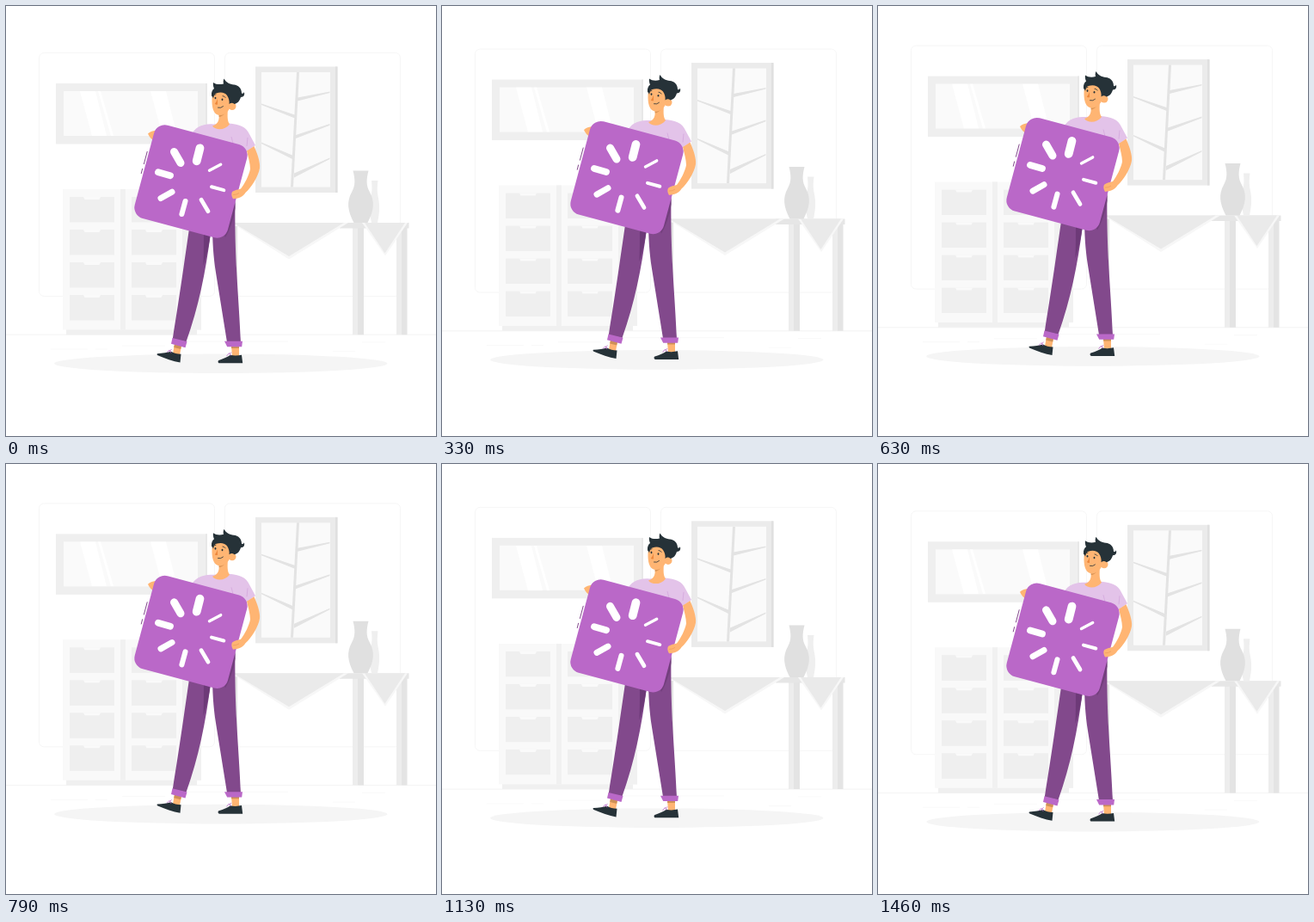
An HTML page that plays this animation: 500x500 px, repeating every 1.5 s.

```html
<!DOCTYPE html>
<html lang="en">
<head>
<meta charset="utf-8">
<title>Floating loader</title>
<style>
html, body { margin: 0; width: 100%; height: 100%; overflow: hidden; background: #fff; }
svg { display: block; width: 100vw; height: 100vh; }
</style>
</head>
<body>
<svg viewBox="0 0 500 500">
<defs>
  <clipPath id="pane"><rect x="67" y="99" width="156" height="52"/></clipPath>
  <g id="drawer">
    <rect width="52" height="29.5" fill="#efefef"/>
    <path d="M16 0h20l-1.500 3h-17z" fill="#fafafa"/>
  </g>
</defs>
<g id="scene">
  <!-- walls and floor -->
  <g fill="none" stroke="#f4f4f4" stroke-width=".8">
    <rect x="38.500" y="54.500" width="204" height="283" rx="5.700"/>
    <rect x="254.500" y="54.500" width="204" height="283" rx="5.700"/>
  </g>
  <path d="M0 382.200H500" stroke="#ebebeb" stroke-width=".6"/>
  <path d="M52 399h43M104 399h14M135 395.200h50M210 390h118M414 391h27M380 401.700h26" stroke="#ebebeb" stroke-width=".3"/>

  <!-- long picture -->
  <rect x="58" y="90" width="176" height="70.500" fill="#efefef"/>
  <path d="M232 90h2v70.500h-2z" fill="#e8e8e8"/>
  <rect x="67" y="99" width="156" height="52" fill="#fafafa"/>
  <g clip-path="url(#pane)" fill="#fff">
    <path d="M86 99h18l13 52h-17zM107 99h3l15 52h-3zM168 99h18l13 52h-17z"/>
  </g>

  <!-- window -->
  <rect x="290" y="70.500" width="95.500" height="146.500" fill="#ebebeb"/>
  <path d="M383 70.500h2.500v146.500h-2.500z" fill="#e0e0e0"/>
  <rect x="297" y="77" width="80" height="133.500" fill="#fafafa"/>
  <g fill="#e3e3e3">
    <path d="M338 77h3L334 210.500h-3z"/>
    <path d="M297 113.500L337 127v4L297 115zM376.500 99.500L339 106.500v4L376.500 101zM376.500 137L337 150v4L376.500 138.700zM297 158.500L334 174v4.500L297 160zM376.500 176.500L335 194.500v5L376.500 178z"/>
  </g>

  <!-- dresser -->
  <path d="M70 376h152v6.200H70z" fill="#f0f0f0"/>
  <path d="M66 213h161v163.500H66z" fill="#f9f9f9"/>
  <path d="M133 213h6v163.500h-6zM205 213h22v163.500h-22z" fill="#f1f1f1"/>
  <g id="drawers"></g>

  <!-- table -->
  <path d="M403 256h6v126.200h-6zM454 256h6v126.200h-6z" fill="#ededed"/>
  <path d="M409 256h7v126.200h-7zM460 256h6.500v126.200h-6.500zM261 256h8v126h-8z" fill="#e4e4e4"/>
  <path d="M388 252h80.500v6.500H388z" fill="#e6e6e6"/>
  <path d="M262 252H398L329 294.500z" fill="#f7f7f7"/>
  <path d="M264 252H393L329 291z" fill="#eaeaea"/>
  <path d="M414 252H467L441 290.500z" fill="#f7f7f7"/>
  <path d="M417 252H464L440.500 287.500z" fill="#eaeaea"/>
  <path d="M425 203h7.500c-1 8-1 12 0 18 2 9 2.500 17-.5 31h-7c-3-14-2.500-22-.5-31 1.200-6 1.200-10 .5-18z" fill="#efefef"/>
  <path d="M403.500 191.500h18c-2.500 10-3 17 1.500 25 6 11 5 21-2.500 35.500h-16c-7.500-14.500-8.500-24.500-2.500-35.500 4.500-8 4-15 1.500-25z" fill="#e0e0e0"/>

  <ellipse cx="249.800" cy="415.800" rx="193.700" ry="11.300" fill="#f5f5f5"/>

  <!-- feet -->
  <g fill="#ffb573">
    <path d="M196 393l8 2-2 11-8-2zM262 395h9v12h-8z"/>
  </g>
  <path d="M196 393l8 2-.8 4-8-2zM262 395h9v3h-9z" fill="#ce9057"/>
  <g fill="#263238">
    <path d="M176 404.200c6-.2 12-1.200 16-2.400 3 2.200 7 2.600 11.500 3l-1 9.700c-8-1.300-18-4.800-26-8.300-1-.6-1.300-1.600-.5-2z"/>
    <path d="M247.500 412c5.500-1.800 10-4 13.500-6.200 4 1.200 9 .8 13-.1l1.200 9.600h-27c-1.700 0-2.200-2.500-.7-3.300z"/>
  </g>
  <path d="M187 403l3-3 2 3.500M190 402l2.500-3M256.500 407l3-3.500 2 3M260 405l2-2.500" fill="none" stroke="#ba68c8" stroke-width=".8"/>

  <!-- trousers -->
  <path d="M216 240L213 259C207 300 203 330 193.800 387l15.700 3.500C224 350 232 310 238 264L250 240z" fill="#82498c"/>
  <path d="M230 260l8 4c-2 14-4 24-8.500 38 .5-14 .5-26 .5-42z" fill="#6d3a78"/>
  <path d="M240 250C240 275 241 290 244 310L257 391h16C271 350 269 325 268 305 267 285 266 260 266.500 220H240z" fill="#82498c"/>
  <path d="M266.500 222L252 262l3 7c6-10 10-22 11.500-34z" fill="#733f7d"/>
  <path d="M193.500 386l17 4.200-2 7-16.500-4.500zM254 389.800h21l-.8 6.400h-17z" fill="#ba68c8"/>

  <!-- shirt, neck -->
  <path d="M214 152C219 141 229 136.500 241 137.500L259 136.500C272 138 279 140 283 149L290 162 280 169 266 230H214z" fill="#e3c3e9"/>
  <path d="M262 152l2 8M281 153l-1 10" stroke="#d3a6dc" stroke-width=".8"/>
  <path d="M247.500 122L258 118C257.500 128 257 133 260 137.500 255 144.500 244 145 240 139.500 247 137 248.500 133 247.500 122z" fill="#ffb573"/>
  <path d="M247.500 125c3 1 6-1 8-3-1 4-4 6.500-7.800 7z" fill="#db9556"/>

  <!-- head -->
  <path d="M241 98C239 106 238.700 117 242 123 245 128.500 253 129 258.500 121.500L266 110 262 96z" fill="#ffb573"/>
  <circle cx="263" cy="116.500" r="4.500" fill="#ffb573"/>
  <path d="M239 104.500C238.500 100 240 97.500 242 96 241 93.500 240.500 91 241 89 244.500 91.500 249 91.500 253 90.500 252.500 88.500 252.500 86.500 253.500 84.500 256 89 260 91 265 91.500 270 92 274 95.500 274 101.500 275.500 102 276.500 101.500 276.800 100 278 103 276.500 106 273 106 272 109.500 270 113 265.500 114 263.500 112 261.500 112.500 259.500 114 260 110 259 107 257 104 255 101 250 99.500 244.500 101.500 243 102 242 103 241 107.500 240.500 106 240 105 239 104.500z" fill="#263238"/>
  <g fill="#263238">
    <ellipse cx="243.500" cy="107" rx=".9" ry="1.300"/>
    <ellipse cx="251.500" cy="108.700" rx=".9" ry="1.300"/>
  </g>
  <path d="M241 104.500q1.200-1.500 3-1.700M252 104.600q2 0 3.200 1.900M246.500 118.200q3.500 1 6-1.500" fill="none" stroke="#263238" stroke-width=".8" stroke-linecap="round"/>
  <path d="M246 107.800q-1.200 4-3.200 6 1.300 1.200 3.200.8z" fill="#ed893e"/>

  <!-- far hand -->
  <path d="M165 148.500C167 146 171 145.300 176 144.500L173 157C169 155.500 166.500 152 165 148.500z" fill="#ffb573"/>

  <!-- board -->
  <rect x="159" y="148" width="112" height="112" rx="13" transform="rotate(15 215 204)" fill="#ba68c8"/>
  <g id="bars" stroke="#fff" stroke-linecap="round"></g>
  <path d="M164.300 169L160.300 184M158.700 189L157.200 195" stroke="#82498c" stroke-width="1"/>

  <!-- near arm -->
  <path d="M288.500 163C292 171 296 182 295 188.500 293.500 198 285.500 211 278.500 217 275.500 222 270 224 264 224.300 262 221 261.800 217.500 263.300 215.800 266 214 270 213.500 273 212.500 278 206 282.500 197 284 189.500 284 183 281.500 175 280 168.500z" fill="#ffb573"/>
  <path d="M264 219.500q4 .2 7-2" fill="none" stroke="#e9965a" stroke-width=".6"/>
</g>
</svg>
<script>
const NS = "http://www.w3.org/2000/svg";
const LOOP = 1500, RISE = 10, LEAD = 30;
const scene = document.getElementById("scene");

function add(parent, tag, attrs) {
  const el = document.createElementNS(NS, tag);
  for (const key in attrs) el.setAttribute(key, attrs[key]);
  document.getElementById(parent).appendChild(el);
}

for (const x of [74, 146])
  for (let row = 0; row < 4; row++)
    add("drawers", "use", { href: "#drawer", x, y: 222 + row * 38 });

// x1, y1, x2, y2, width
const bars = [
  [195.5, 169.5, 203, 182.5, 9],
  [225.5, 165.3, 221.7, 180.3, 9.8],
  [236.5, 191.3, 249.7, 184.3, 3.4],
  [239, 210.3, 253.3, 214.2, 4],
  [227, 225.3, 235, 238.8, 4.8],
  [208.5, 227, 204.4, 242, 6],
  [180, 223.5, 193, 216.2, 7],
  [177, 193.3, 191, 197.3, 7.8]
];
for (const [x1, y1, x2, y2, w] of bars)
  add("bars", "line", { x1, y1, x2, y2, "stroke-width": w });

// Linear rise for half the loop, then linear fall.
function draw(ms) {
  const p = ((ms + LEAD) % LOOP) / LOOP;
  const lift = RISE * (1 - Math.abs(2 * p - 1));
  scene.setAttribute("transform", `translate(0 ${(0.4 - lift).toFixed(3)})`);
}

const start = performance.now();
function tick(now) {
  draw(Math.max(0, now - start));
  requestAnimationFrame(tick);
}
draw(0);
requestAnimationFrame(tick);
</script>
</body>
</html>
```
